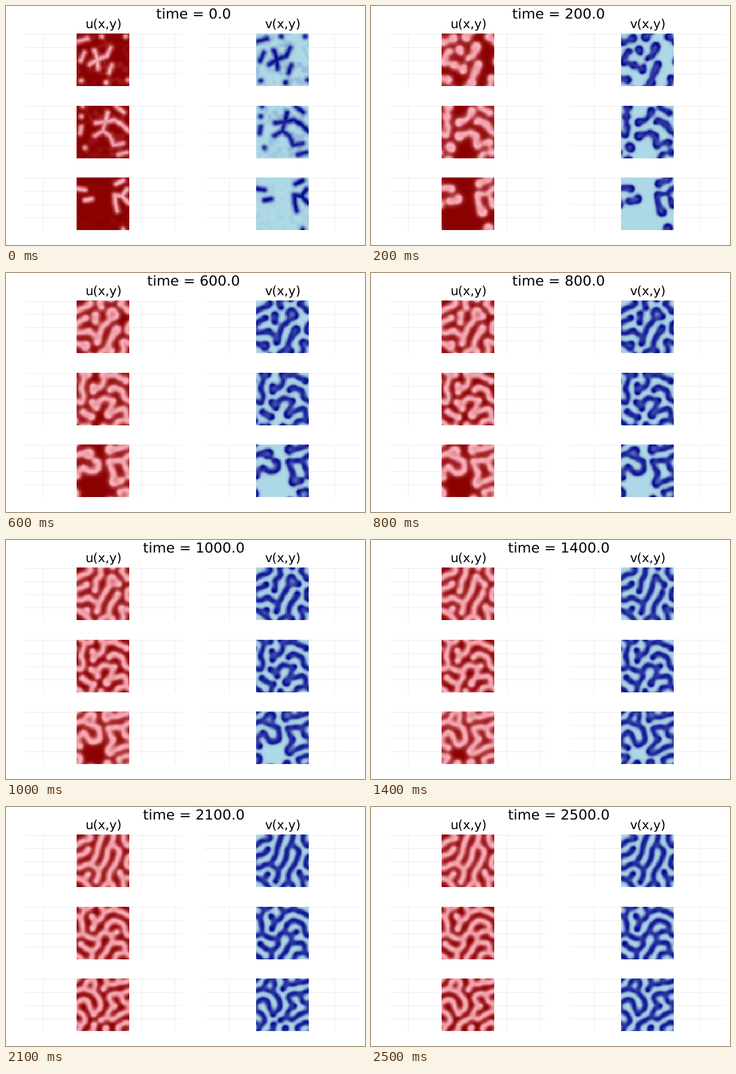
A matplotlib script that plays this animation: 600 px wide and 400 px high, repeating every 2600 ms.

```python
import numpy as np
import matplotlib.pyplot as plt
from matplotlib.animation import FuncAnimation
from matplotlib.colors import LinearSegmentedColormap

plt.rcParams["text.hinting"] = "none"

W, H, DPI = 600, 400, 100
N, PX = 80, 1.1            # cells per side, pixels per cell
FRAMES, STEPS = 26, 100    # reaction steps between frames
DU, DV, FEED, KILL = 1.0, 0.5, 0.055, 0.062
REACH = 16.5               # longest branch between two seeds, in pixels

# Seed points in panel pixels; each branches from its nearest earlier neighbour
TOP = [(3, 13), (18, 9), (42, 5), (82, 5), (13, 32), (7, 46), (30, 29), (35, 44),
       (50, 38), (57, 24), (36, 59), (22, 52), (59, 53), (54, 66), (8, 79),
       (49, 82), (86, 78)]
MIDDLE = [(10, 1), (8, 18), (8, 35), (6, 46), (52, 12), (48, 27), (44, 42),
          (31, 50), (32, 29), (56, 51), (62, 66), (66, 1), (79, 11), (64, 24),
          (76, 32), (87, 43), (78, 63), (70, 82), (84, 78), (14, 70)]
BOTTOM = [(2, 19), (14, 21), (14, 38), (25, 36), (66, 11), (78, 5), (64, 30),
          (76, 31), (84, 20), (87, 43), (65, 44), (68, 56), (78, 87)]

cell_y, cell_x = (np.mgrid[:N, :N] + 0.5) * PX


def segment_distance2(a, b):
    dx, dy = b[0] - a[0], b[1] - a[1]
    length2 = max(dx * dx + dy * dy, 1e-9)
    t = np.clip(((cell_x - a[0]) * dx + (cell_y - a[1]) * dy) / length2, 0, 1)
    return (cell_x - a[0] - t * dx) ** 2 + (cell_y - a[1] - t * dy) ** 2


def branches(points, width=4.8):
    """Soft ridge of height 1 along the tree that joins nearby points."""
    nearest = np.full((N, N), 1e6)
    for i, p in enumerate(points):
        near = min(points[:i], key=lambda q: np.hypot(p[0] - q[0], p[1] - q[1]),
                   default=p)
        if np.hypot(p[0] - near[0], p[1] - near[1]) > REACH:
            near = p
        nearest = np.minimum(nearest, segment_distance2(near, p))
    return np.exp(-nearest / width ** 2)


def mottle(rng):
    """Smooth periodic noise, positive part only."""
    freq = np.fft.fftfreq(N)
    radius2 = freq[:, None] ** 2 + freq[None, :] ** 2
    spectrum = np.fft.fft2(rng.standard_normal((N, N))) * np.exp(-radius2 * 160)
    noise = np.fft.ifft2(spectrum).real
    return np.clip(noise / noise.std(), 0, 2)


def laplacian(a):
    """Nine-point stencil on a periodic grid."""
    rows = np.roll(a, 1, 1) + np.roll(a, -1, 1)
    cols = np.roll(a, 1, 2) + np.roll(a, -1, 2)
    corners = np.roll(rows, 1, 2) + np.roll(rows, -1, 2)
    return 0.2 * (rows + cols) + 0.05 * corners - a


def simulate():
    rng = np.random.default_rng(4)
    v = np.stack([0.4 * branches(points) + level * mottle(rng)
                  for points, level in ((TOP, 0.03), (MIDDLE, 0.03), (BOTTOM, 0.01))])
    u = np.clip(1 - 1.3 * v, 0.4, 1)
    states = [(u, v)]
    for _ in range(FRAMES - 1):
        for _ in range(STEPS):
            reaction = u * v * v
            u, v = (u + DU * laplacian(u) - reaction + FEED * (1 - u),
                    v + DV * laplacian(v) + reaction - (FEED + KILL) * v)
        states.append((u, v))
    return states


states = simulate()

fig = plt.figure(figsize=(W / DPI, H / DPI), dpi=DPI, facecolor="white")
ax = fig.add_axes([0, 0, 1, 1])
ax.axis("off")

reds = LinearSegmentedColormap.from_list("reds", ["lightpink", "darkred"])
blues = LinearSegmentedColormap.from_list("blues", ["lightblue", "darkblue"])
COLUMNS = (
    # left edge, grid span, vertical grid lines, colours, title
    (118, (32, 294), (62.3, 227.3, 282.3), reds, "u(x,y)"),
    (418, (332, 592), (373.3, 549.3), blues, "v(x,y)"),
)


def label(x, baseline, text, size):
    return ax.text(x, baseline, text, fontsize=size * 72 / DPI, ha="center",
                   va="baseline", family="DejaVu Sans", color="black")


images = []
for field, (left, span, ticks, cmap, name) in enumerate(COLUMNS):
    label(left + 45, 38, name, 21)
    for row in range(3):
        top = 47 + 120.4 * row
        grid = dict(colors="#ededed", linewidths=0.72, zorder=1, snap=False)
        ax.hlines([top + 0.55 + 22 * i for i in range(4)], *span, **grid)
        ax.vlines(ticks, top, top + 88, **grid)
        image = ax.imshow(states[0][field][row], cmap=cmap, aspect="auto",
                          interpolation="nearest", zorder=2,
                          extent=(left, left + 88, top + 87.4, top))
        images.append((image, field, row))
clock = label(314, 21, "", 23.5)
ax.set_xlim(0, W)
ax.set_ylim(H, 0)


def draw(frame):
    for image, field, row in images:
        data = states[frame][field][row]
        image.set_data(data)
        image.set_clim(data.min(), data.max())
    clock.set_text(f"time = {frame * 100:.1f}")
    return [image for image, _, _ in images] + [clock]


anim = FuncAnimation(fig, draw, frames=FRAMES, interval=100, repeat=True)
plt.show()
```
